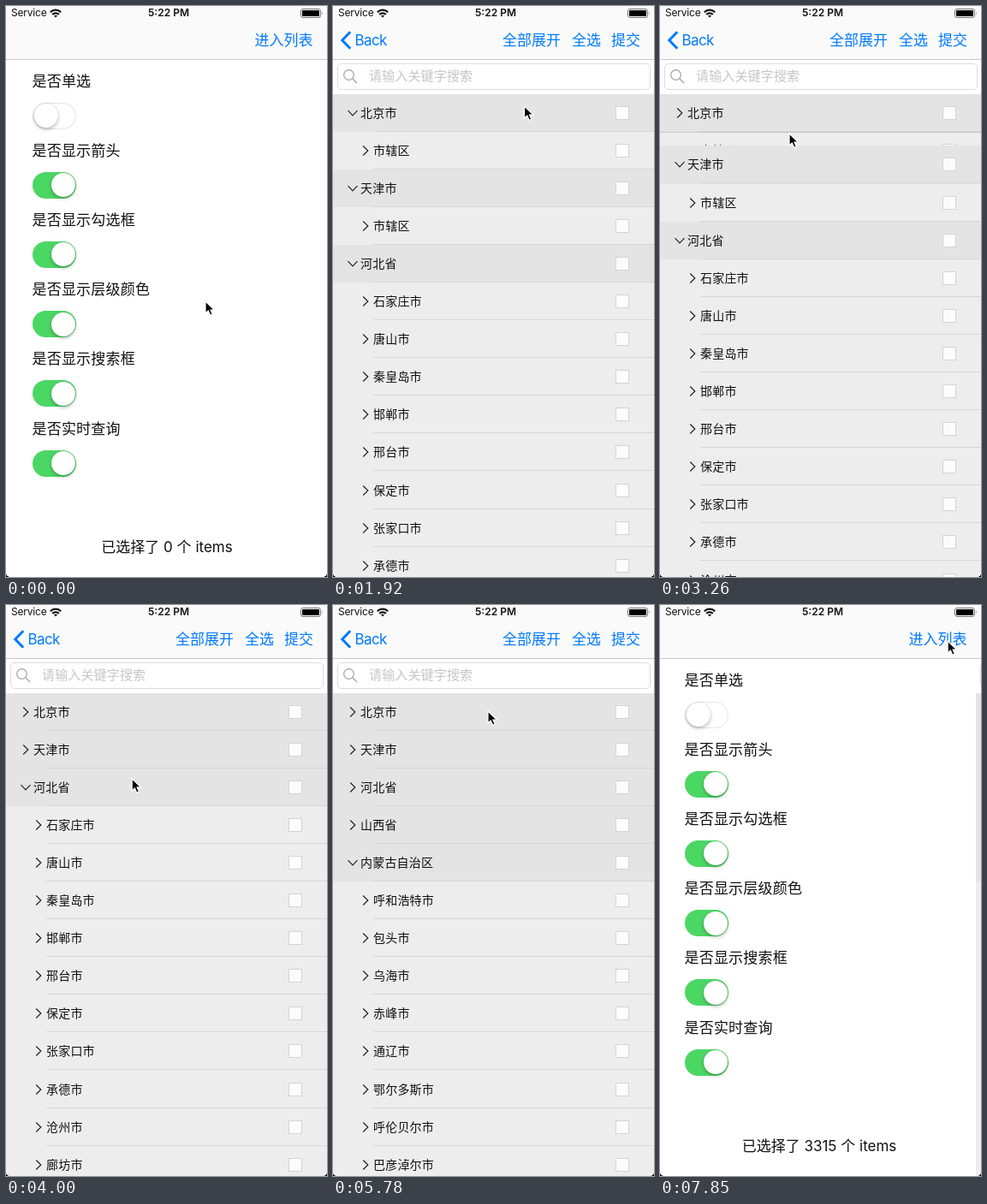
Write an HTML page that moves like this. It is 375 by 667 pixels and loops after 7.99 s.

```html
<!DOCTYPE html>
<html lang="zh-CN">
<head>
<meta charset="utf-8">
<title>Region picker</title>
<style>
  html, body { margin: 0; width: 100%; height: 100%; overflow: hidden; background: #000; }
  #stage, .page { position: absolute; left: 0; top: 0; width: 375px; height: 667px; overflow: hidden; background: #fff; }
  #stage {
    border-radius: 0 0 5px 5px; color: #111; white-space: nowrap;
    font: 17px/24px Inter, "Noto Sans CJK SC", "Noto Sans CJK", sans-serif;
  }
  #stage div, #stage span, #stage svg { position: absolute; }
  svg { overflow: visible; fill: none; }

  .label { left: 30.5px; letter-spacing: .2px; }
  .switch { box-sizing: border-box; left: 31px; width: 51px; height: 31px; border-radius: 16px; background: #4bd763; }
  .switch::after {
    content: ""; position: absolute; left: 22px; top: 1.5px; width: 28px; height: 28px;
    border-radius: 50%; background: #fff; box-shadow: 0 2px 4px #0004, 0 0 1px #0003;
  }
  .switch.off { background: #fff; border: 1.5px solid #e5e5e5; }
  .switch.off::after { left: .5px; top: 0; }
  #count { left: 0; width: 376px; top: 620px; text-align: center; }
  #dim { inset: 0; background: #000; }

  .field { box-sizing: border-box; left: 5px; top: 67px; width: 366px; height: 31px; border: 1px solid #dcdcdc; border-radius: 5px; }
  .hint { left: 42px; top: 70px; font-size: 15px; letter-spacing: .15px; color: #c6c6ca; }
  .row { left: 0; width: 375px; height: 45px; font-size: 14px; line-height: 44px; background: #fff; }
  .row span { left: 44.5px; letter-spacing: .2px; }
  .row::after { content: ""; position: absolute; left: 16px; right: 0; top: 43px; height: 1px; background: #dadada; }
  .l0 { background: #e4e4e4; }
  .l1 { background: #ededed; }
  .l0 span { left: 32px; }
  .l1 span { left: 47px; }
  .l0::after, .l1::after { left: 47px; background: #d6d6d6; }
  .arrow { left: 17px; top: 16px; }
  .l1 .arrow { left: 32px; }
  .open .arrow { transform: rotate(90deg); }
  .box { box-sizing: border-box; left: 330px; top: 14px; width: 16px; height: 16px; border: 1px solid #d4d4d4; background: #fcfcfc; }
  .tick { left: 2px; top: 2px; visibility: hidden; }
  .checked .tick { visibility: inherit; }
  #edge { left: 0; width: 375px; height: 1px; background: #c4c4c4; }
  #bar { left: 370px; top: 65px; width: 2.5px; height: 36px; border-radius: 2px; background: #b2b2b2; }

  .nav { left: 0; top: 0; width: 375px; height: 62px; background: #fafafa; border-bottom: 1px solid #c9c9c9; color: #007aff; }
  .nav span { top: 28px; }
  .status { font-size: 12px; line-height: 16px; color: #111; }
  .nav .status { top: 0; }
</style>
</head>
<body>
<div id="stage">
  <div class="page" id="settings">
    <div id="count"></div>
    <div id="dim"></div>
  </div>
  <div class="page" id="list">
    <div class="field"></div>
    <svg width="16" height="16" style="left:12px;top:74px" stroke="#a0a0a0" stroke-width="1.2"><circle cx="6.5" cy="6.5" r="5.8"/><path d="M11 11l5 5"/></svg>
    <span class="hint">请输入关键字搜索</span>
    <div id="rows"></div>
    <div id="edge"></div>
    <div id="bar"></div>
  </div>
  <div class="nav">
    <span class="status" style="left:6px;letter-spacing:-.2px">Service</span>
    <svg width="14" height="11" style="left:51px;top:3px" stroke="#111" stroke-width="2.2"><path d="M.8 4.2a9 9 0 0 1 12.4 0M3.2 6.9a5.4 5.4 0 0 1 7.6 0"/><path d="M7 10.6L5 8.6a2.9 2.9 0 0 1 4 0z" fill="#111" stroke="none"/></svg>
    <span class="status" style="left:166px;font-weight:600">5:22 PM</span>
    <svg width="26" height="11" style="left:344px;top:3px"><rect x=".5" y=".5" width="23" height="10" rx="2.5" stroke="#777"/><rect x="2" y="2" width="20" height="7" rx="1" fill="#000"/><path d="M25 3.7q1.6 1.8 0 3.6z" fill="#777"/></svg>
    <div id="navHome"><span style="left:290.5px">进入列表</span></div>
    <div id="navList">
      <svg width="13" height="22" style="left:9px;top:29px" stroke="#007aff" stroke-width="3"><path d="M11.2 1.2L1.8 11l9.4 9.8"/></svg>
      <span style="left:25.5px;letter-spacing:-.6px">Back</span>
      <span style="left:198px">全部展开</span>
      <span style="left:279px">全选</span>
      <span style="left:325px">提交</span>
    </div>
  </div>
  <svg id="cursor" width="12" height="18" style="left:0;top:0"><path d="M0 0v14l3.3-3 2.3 5.3 2.6-1.1L6 10h4.4z" fill="#000" stroke="#fff" stroke-width="1.2"/></svg>
</div>
<script>
const LOOP = 7990, STEP = 148.1, ROW = 44.1, TOP = 102.5;
const PUSH = 930, POP = 7510, EXPAND = 2230, SELECT_ALL = 6750;
const $ = id => document.getElementById(id);
const words = (text, end) => text.split(' ').map(w => w + end);

['单选', '显示箭头', '显示勾选框', '显示层级颜色', '显示搜索框', '实时查询'].forEach((name, i) => {
  const y = i * 81.2;
  $('count').insertAdjacentHTML('beforebegin',
    `<span class="label" style="top:${75.5 + y}px">是否${name}</span>
     <div class="switch ${i ? '' : 'off'}" style="top:${112.5 + y}px"></div>`);
});

function addRow(name, level) {
  const row = document.createElement('div');
  row.className = 'row l' + level;
  const arrow = '<svg class="arrow" width="12" height="12" stroke="#222" stroke-width="1.2"><path d="M3.2 .5L8.8 6l-5.6 5.5"/></svg>';
  row.innerHTML = (level < 2 ? arrow : '') + `<span>${name}</span><div class="box">
    <svg class="tick" width="10" height="10" stroke="#007aff" stroke-width="1.6"><path d="M1 5l3 3 5-6.5"/></svg></div>`;
  $('rows').append(row);
  return row;
}

// Each province: name, children, time it is folded.
const provinces = [
  ['北京市', ['市辖区'], 2985],
  ['天津市', ['市辖区'], 3520],
  ['河北省', words('石家庄 唐山 秦皇岛 邯郸 邢台 保定 张家口 承德 沧州 廊坊 衡水', '市'), 4060],
  ['山西省', words('太原 大同 阳泉 长治 晋城 朔州 晋中 运城 忻州 临汾 吕梁', '市'), 4592],
  ['内蒙古自治区', words('呼和浩特 包头 乌海 赤峰 通辽 鄂尔多斯 呼伦贝尔 巴彦淖尔 乌兰察布', '市'), Infinity]
].map(([name, kids, fold], i) => ({
  row: addRow(name, 0),
  kids: kids.map(k => addRow(k, 1)),
  leaves: i ? [] : words('东城 西城 朝阳 丰台 石景山 海淀 门头沟 房山 通州 顺义 昌平 大兴 怀柔 平谷 密云 延庆', '区').map(k => addRow(k, 2)),
  fold
}));

// Pointer stops: time, x, y.
const path = [
  [0, 233, 345], [148, 233, 345], [890, 332, 42], [1040, 332, 42], [1333, 306, 58],
  [2200, 147, 172], [2666, 146, 171], [2960, 150, 137], [3258, 151, 149], [3520, 150, 165],
  [3800, 148, 172], [4060, 147, 208], [4300, 142, 226], [4591, 140, 242], [4887, 289, 140],
  [5183, 341, 67], [5340, 341, 67], [5776, 181, 124], [6500, 298, 41], [6900, 298, 41],
  [7250, 337, 42], [8000, 336, 42]
];

const clamp = x => Math.min(1, Math.max(0, x));
const smooth = x => x * x * (3 - 2 * x);
const fade = (t, start, length = 290) => smooth(clamp((t - start) / length));
const spring = (t, start) => {
  const x = Math.max(0, t - start) * .018;
  return 1 - (1 + x) * Math.exp(-x);
};

function place(row, y, visible = true) {
  row.style.top = Math.round(y) + 'px';
  row.style.visibility = visible && y < 667 ? 'inherit' : 'hidden';
}

function drawRows(t) {
  const unfolded = fade(t, EXPAND, 300);
  let y = TOP;
  for (const { row, kids, leaves, fold } of provinces) {
    const shown = 1 - fade(t, fold, fold < 3000 ? 300 : 290);
    place(row, y);
    row.classList.toggle('open', t < fold);
    y += ROW;
    kids.forEach((kid, i) => place(kid, y + i * ROW, shown > 0));
    const first = y + kids.length * ROW;
    leaves.forEach((leaf, i) => place(leaf, first + i * ROW, shown * unfolded > 0));
    y += (kids.length + leaves.length * unfolded) * ROW * shown;
  }
  provinces[0].kids[0].classList.toggle('open', t >= EXPAND);
}

function drawCursor(t) {
  const i = path.findIndex(p => p[0] > t);
  const [t0, x0, y0] = path[i - 1], [t1, x1, y1] = path[i];
  const k = smooth((t - t0) / (t1 - t0));
  $('cursor').style.transform = `translate(${x0 + (x1 - x0) * k}px, ${y0 + (y1 - y0) * k}px)`;
}

function draw(t) {
  const shown = spring(t, PUSH) - spring(t, POP);
  $('list').style.transform = `translateX(${Math.round(375 * (1 - shown))}px)`;
  $('settings').style.transform = `translateX(${-Math.round(112 * shown)}px)`;
  $('dim').style.opacity = .1 * shown;
  $('navList').style.opacity = clamp(shown * 1.2 - .1);
  $('navHome').style.opacity = clamp(1.1 - shown * 1.2);
  $('count').textContent = `已选择了 ${t < 7300 ? 0 : 3315} 个 items`;
  $('rows').classList.toggle('checked', t >= SELECT_ALL);
  $('bar').style.opacity = fade(t, EXPAND, 250) - fade(t, 2750, 300);
  const folding = t > 2985 && t < 3400, settling = t > 4430 && t < 4700;
  $('edge').style.visibility = folding || settling ? 'inherit' : 'hidden';
  $('edge').style.top = (folding ? 147 : 322) + 'px';
  drawRows(t);
  drawCursor(t);
}

const start = performance.now();
function tick() {
  const t = (performance.now() - start) % LOOP;
  draw(Math.floor((t + 4) / STEP) * STEP);
  requestAnimationFrame(tick);
}
tick();
</script>
</body>
</html>
```
